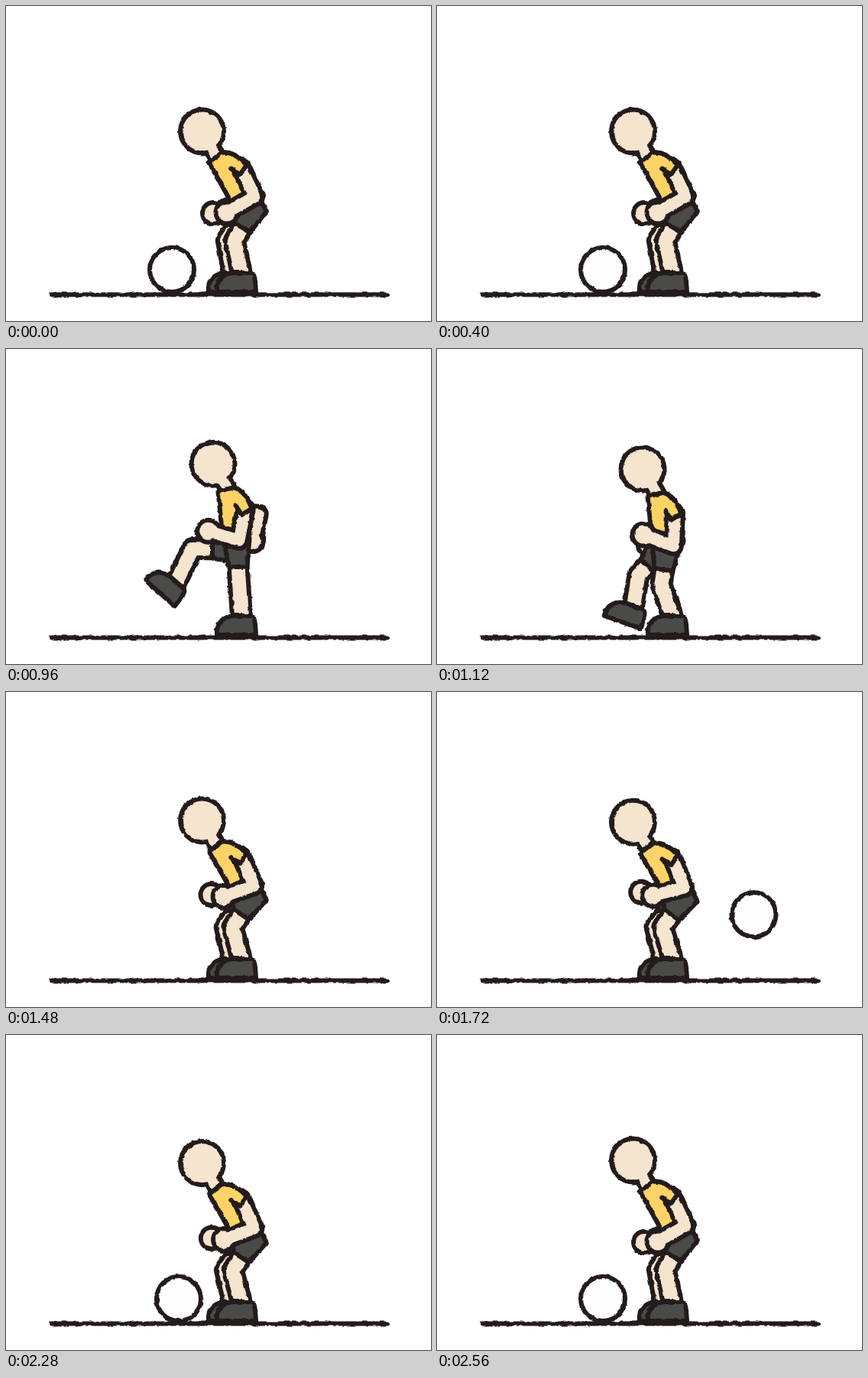
These frames come from a looping animation (556 by 412 pixels, 2600 ms). An HTML page:

```html
<!DOCTYPE html>
<html lang="en">
<head>
<meta charset="utf-8">
<title>Kick and return</title>
<style>
  html, body { margin: 0; height: 100%; overflow: hidden; background: #fff; }
  svg { display: block; width: 100vw; height: 100vh; }
</style>
</head>
<body>
<svg viewBox="0 0 556 412">
  <filter id="rough" filterUnits="userSpaceOnUse" x="0" y="0" width="556" height="412" color-interpolation-filters="sRGB">
    <feTurbulence type="fractalNoise" baseFrequency=".14" numOctaves="2" seed="4"/>
    <feDisplacementMap in="SourceGraphic" scale="3.5" xChannelSelector="R" yChannelSelector="G"/>
  </filter>
  <g id="scene" filter="url(#rough)" stroke-linecap="round" stroke-linejoin="round"></g>
</svg>
<script>
const INK = '#231b1c', SKIN = '#f5e4ce', SHIRT = '#fdd366', DARK = '#4a4a49';
const LOOP = 2600, TICK = 40, GRAVITY = .00179, FLOOR = 345;
const scene = document.getElementById('scene');

const mix = (a, b, k) => a.map((v, i) => v + (b[i] - v) * k);

// Pose: head, hip, hand, far hand, kicking ankle, foot angle, leg bone length.
// All other joints follow from these.
const ready = [256.5,164, 321,269, 289,270, 271,271, 297,350, 0, 44];
const crouch = [256.5,172, 321,273, 281,265, 266,259, ...ready.slice(8)];
const windup = [247,164, 316,265, 360,263, 250,260, 387,314, -100, 48];
const follow = [272,147, 303,259, 262,236, 346,248, 205,290, 52, 54];
const land = [269,157, 300,265, 270,243, 277,257, 257,337, 20, 41.5];
const strike = [...mix(windup, follow, .5).slice(0, 8), 284,338, 4, 44];

const keys = [
  [0, ready], [600, ready], [680, mix(ready, windup, 1.15)], [720, windup], [760, windup],
  [800, strike], [880, follow], [1120, land], [1160, land],
  [1480, mix(ready, crouch, .5)], [1920, crouch], [2560, ready], [LOOP, ready]
];

function poseAt(t) {
  const i = keys.findIndex(([time]) => time > t);
  const [t0, a] = keys[i - 1], [t1, b] = keys[i];
  return mix(a, b, (t - t0) / (t1 - t0));
}

const shift = ([x, y], dx, dy) => [x + dx, y + dy];
const line = (d, color, width, fill = 'none') =>
  `<path d="${d}" stroke="${color}" stroke-width="${width}" fill="${fill}"/>`;
const shape = (d, fill) => line(d, INK, 6, fill);
const disc = ([x, y], r, fill) => `<circle cx="${x}" cy="${y}" r="${r}" fill="${fill}"/>`;

// Skin line with an optional round end, outlined as one shape
function limb(points, width, end, r = 0) {
  const d = 'M' + points.join('L');
  return line(d, INK, width + 12) + (r ? disc(end, r + 6, INK) : '') +
    line(d, SKIN, width) + (r ? disc(end, r, SKIN) : '');
}

// Local axes along a segment: place(across, along)
function axes([x0, y0], [x1, y1]) {
  const len = Math.hypot(x1 - x0, y1 - y0);
  const dx = (x1 - x0) / len, dy = (y1 - y0) / len;
  return { len, place: (u, v) => [x0 + u * dy + v * dx, y0 - u * dx + v * dy] };
}

// Middle joint of two equal bones; side 1 bends backwards, -1 forwards
function bend(from, to, bone, side) {
  const { len, place } = axes(from, to);
  return place(side * Math.sqrt(Math.max(0, bone ** 2 - len ** 2 / 4)), len / 2);
}

const foot = ([x, y], angle) => `<g transform="translate(${x} ${y}) rotate(${angle})">` +
  shape('M-32 24C-34 8-23 0-10-1L13-1Q17 0 18 10L19 24Z', DARK) + '</g>';

function shorts(front, back, hip, knee) {
  const { place } = axes(hip, knee);
  return shape('M' + [front, back, place(17, -10), place(12, 24), place(-12, 24)].join('L') + 'Z', DARK);
}

function figure(pose) {
  const [head, hip, hand, farHand, farAnkle] = [0, 2, 4, 6, 8].map(i => pose.slice(i, i + 2));
  const [footAngle, bone] = pose.slice(10);
  const neck = shift(head, 19, 32), farHip = shift(hip, -8, 1), ankle = [308, 350];

  const { len, place } = axes(neck, hip);
  const front = place(-16, len * .72), back = place(20, len * .72);
  const shoulder = place(19, 30), farShoulder = place(0, 32);
  const elbow = bend(shoulder, hand, 42, 1), farElbow = bend(farShoulder, farHand, 36, 1);
  const knee = bend(hip, ankle, 44, -1), farKnee = bend(farHip, farAnkle, bone, -1);

  const sleeve = `L${place(13, 37)}L${place(27, 31)}Q${place(23, 7)} ${place(8, 0)}`;
  const torso = `M${place(-13, 2)}Q${place(-14, 24)} ${front}L${back}${sleeve}Z`;

  return limb([farShoulder, farElbow, farHand], 14, farHand, 11) +
    limb([farHip, farKnee, farAnkle], 18) + foot(farAnkle, footAngle) +
    shorts(front, back, farHip, farKnee) +
    limb([head, neck], 13, head, 25.5) +
    limb([hip, knee, ankle], 18) + foot(ankle, 0) +
    shorts(front, back, hip, knee) +
    shape(torso, SHIRT) +
    limb([shoulder, elbow, hand], 15, hand, 11.5) +
    shape(`M${place(7, 24)}${sleeve}`, SHIRT);
}

function ballAt(t) {
  if (t <= 800) return [217, FLOOR];
  if (t <= 840) return [43, 265];
  if (t < 1600) return null;
  const x = 217 + 92 * (Math.max(0, 2558 - t) / 638) ** 2.8;
  // Each hop is a parabola between two ground contacts
  const bounces = [1220, 1780, 2060, 2200];
  const i = bounces.findIndex(time => time > t);
  return [x, FLOOR - (i > 0 ? GRAVITY * (t - bounces[i - 1]) * (bounces[i] - t) : 0)];
}

function draw(elapsed) {
  const t = Math.floor((elapsed % LOOP) / TICK) * TICK;
  const ball = ballAt(t);
  scene.innerHTML = line('M60 377.5H499', INK, 6) + figure(poseAt(t)) +
    (ball ? disc(ball, 32, INK) + disc(ball, 26, '#fdfdfd') : '');
}

let start;
function loop(now) {
  start ??= now;
  draw(now - start);
  requestAnimationFrame(loop);
}
requestAnimationFrame(loop);
</script>
</body>
</html>
```
